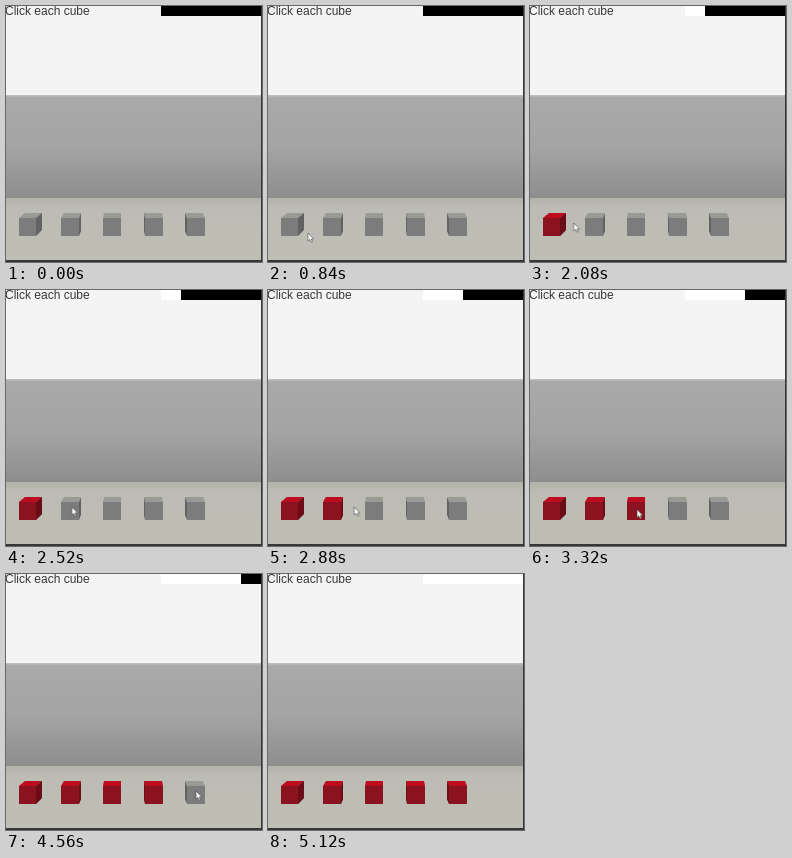
An HTML page for the animation above (5720 ms loop, 256x256 px).

```html
<!DOCTYPE html>
<html lang="en">
<head>
<meta charset="utf-8">
<title>Click each cube</title>
<style>
html, body { margin: 0; width: 100%; height: 100%; overflow: hidden; background: #f4f4f4; }
svg { display: block; width: 100vw; height: 100vh; }
text { font: 12px "Liberation Sans", Arial, sans-serif; fill: #383838; }

.top { fill: var(--top); }
.front { fill: var(--front); }
.side { fill: var(--side); }
.idle { --top: #9a9a94; --front: #7c7c7c; --side: #626262; }
.hit { --top: #bd0c20; --front: #8b131f; --side: #6c0c17; }

.hit, .bar, .pointer { animation: 5720ms infinite step-end; }
.hit:nth-child(1) { animation-name: hit1; }
.hit:nth-child(2) { animation-name: hit2; }
.hit:nth-child(3) { animation-name: hit3; }
.hit:nth-child(4) { animation-name: hit4; }
.hit:nth-child(5) { animation-name: hit5; }
.bar { animation-name: progress; }
.pointer { animation-name: move; animation-timing-function: ease-in-out; }

@keyframes hit1 { 0% { visibility: hidden } 33.57%, to { visibility: visible } }
@keyframes hit2 { 0% { visibility: hidden } 45.45%, to { visibility: visible } }
@keyframes hit3 { 0% { visibility: hidden } 56.64%, to { visibility: visible } }
@keyframes hit4 { 0% { visibility: hidden } 69.23%, to { visibility: visible } }
@keyframes hit5 { 0% { visibility: hidden } 81.82%, to { visibility: visible } }

@keyframes progress {
  0% { transform: translateX(0) }
  33.57% { transform: translateX(20px) }
  45.45% { transform: translateX(40px) }
  56.64% { transform: translateX(60px) }
  69.23% { transform: translateX(80px) }
  81.82%, to { transform: translateX(100px) }
}

@keyframes move {
  0%, 8.5% { transform: translate(54px, 258px) }
  14.69% { transform: translate(40px, 227px) }
  24.5% { transform: translate(25px, 218px) }
  33.57% { transform: translate(26px, 218px); animation-timing-function: linear }
  36.36% { transform: translate(43.5px, 217px); animation-timing-function: ease-out }
  39.86% { transform: translate(65px, 217px) }
  46.15% { transform: translate(66px, 217px); animation-timing-function: linear }
  50.35% { transform: translate(86px, 217px); animation-timing-function: ease-out }
  53.85% { transform: translate(106px, 219px) }
  58.04% { transform: translate(107px, 219.5px) }
  62.5% { transform: translate(109px, 219px) }
  68.5% { transform: translate(150px, 216px) }
  70.63% { transform: translate(151px, 216px) }
  74.13% { transform: translate(152px, 216px) }
  79.5% { transform: translate(190px, 217px) }
  83.92% { transform: translate(192px, 217px) }
  88.81%, to { transform: translate(258px, 208px) }
}
</style>
</head>
<body>
<svg viewBox="0 0 256 256" preserveAspectRatio="none">
  <defs>
    <linearGradient id="wall" x2="0" y2="1">
      <stop stop-color="#c4c4c4"/>
      <stop offset=".025" stop-color="#a9a9a9"/>
      <stop offset=".5" stop-color="#a4a4a4"/>
      <stop offset="1" stop-color="#8e8e8e"/>
    </linearGradient>
    <linearGradient id="floor" x2="0" y2="1">
      <stop stop-color="#b3b2aa"/>
      <stop offset=".15" stop-color="#bdbcb4"/>
      <stop offset="1" stop-color="#bfbeb5"/>
    </linearGradient>
    <g id="c1">
      <path class="top" d="M13 212L19 207H36L30 212Z"/>
      <path class="front" d="M13 212H30V230H13Z"/>
      <path class="side" d="M30 212L36 207V224L30 230Z"/>
    </g>
    <g id="c2">
      <path class="top" d="M55 212L58 207H75L73 212Z"/>
      <path class="front" d="M55 212H73V230H55Z"/>
      <path class="side" d="M73 212L75 207V225L73 230Z"/>
    </g>
    <g id="c3">
      <path class="top" d="M97 212L98 207H115V212Z"/>
      <path class="front" d="M97 212H115V230H97Z"/>
    </g>
    <g id="c4">
      <path class="top" d="M139 212L138 207H156L157 212Z"/>
      <path class="front" d="M139 212H157V230H139Z"/>
      <path class="side" d="M139 212L138 207V225L139 230Z"/>
    </g>
    <g id="c5">
      <path class="top" d="M181 212L179 207H197L199 212Z"/>
      <path class="front" d="M181 212H199V230H181Z"/>
      <path class="side" d="M181 212L179 207V225L181 230Z"/>
    </g>
  </defs>

  <rect width="256" height="256" fill="#f4f4f4"/>
  <rect y="89" width="256" height="103" fill="url(#wall)"/>
  <rect y="192" width="256" height="64" fill="url(#floor)"/>

  <g class="idle">
    <use href="#c1"/><use href="#c2"/><use href="#c3"/><use href="#c4"/><use href="#c5"/>
  </g>
  <g>
    <use class="hit" href="#c1"/><use class="hit" href="#c2"/><use class="hit" href="#c3"/><use class="hit" href="#c4"/><use class="hit" href="#c5"/>
  </g>

  <text x="-1" y="9">Click each cube</text>
  <rect x="155" width="100" height="10" fill="#fff"/>
  <rect class="bar" x="155" width="100" height="10"/>
  <rect x="255" width="1" height="256" fill="#39363b"/>
  <rect y="254" width="256" height="2" fill="#39363b"/>

  <path class="pointer" d="M0 0V8L1.8 6.4L3 9.2L4.4 8.6L3.2 5.9H5.7Z" fill="#fff" stroke="#444" stroke-width=".6"/>
</svg>
</body>
</html>
```
